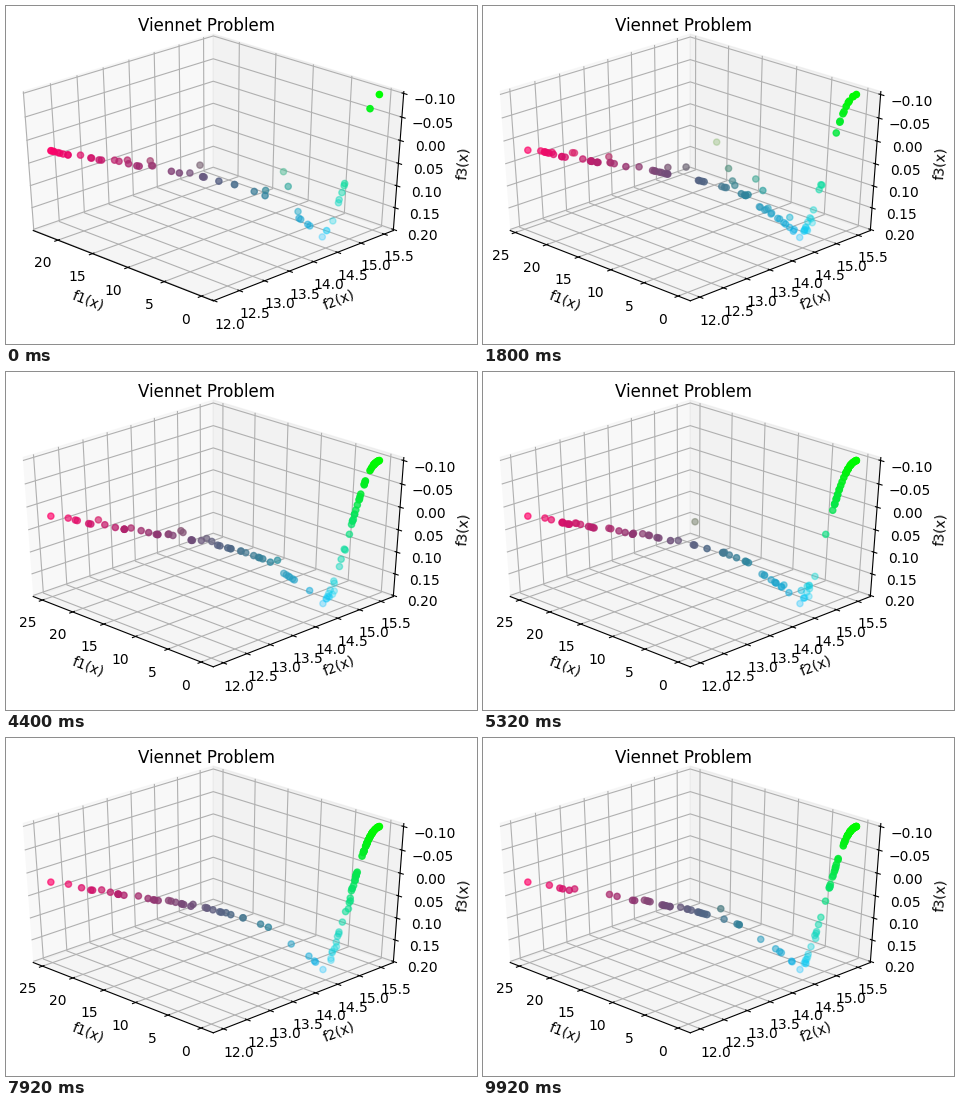
A matplotlib script for the animation above (10 s loop, 471x338 px).

```python
import numpy as np
import matplotlib.pyplot as plt
from matplotlib.animation import FuncAnimation
from matplotlib.ticker import MultipleLocator

W, H, DPI = 471, 338, 100
GENERATIONS = 100
AXES_BOX = (-31.5, 14, 465, 294)  # left, top, width, height in pixels

plt.rcParams["font.family"] = "DejaVu Sans"

rng = np.random.default_rng(7)
CHANCE = rng.random((100, 40, 4))
TURN = rng.normal(size=(100, 40))


def objectives(x, y):
    s = x**2 + y**2
    f1 = s / 2 + np.sin(s)
    f2 = (3 * x - 2 * y + 4) / 8 + (x - y + 1) / 27 + 15
    f3 = 1 / (s + 1) - 1.1 * np.exp(-s)
    return np.array([f1, f2, f3])


def individual(i, gen):
    """Decision vector of one individual; it is replaced every few generations."""
    epoch = (gen + i * 5) // (4 + i * 7 % 9) % 40
    kind, u, stray, band = CHANCE[i, epoch]
    age = gen / GENERATIONS
    green = 0.09 + 0.36 * age**0.8
    if kind < green:
        s, spread = (0.8 * u) ** 2, 0.15
    elif kind < green + 0.13:
        s, spread = 0.7 + 1.5 * u, 0.3
    else:
        s, spread = 4.19 + 2 * np.pi * int(7 * band) + 3.1 * u, 0.04
        if stray < 0.3 - 0.15 * age:
            spread = 0.45
    angle = np.arctan2(0.287, -0.412) + spread * TURN[i, epoch]
    r = np.sqrt(s)
    x, y = r * np.cos(angle), r * np.sin(angle)
    if x < -5:
        x, y = -5, np.sqrt(max(s - 25, 0))
    return x, min(y, 5)


def population(gen):
    size = int(100 - 46 * np.exp(-gen / 4))
    fade = np.exp(-gen / 7)
    ends = [(-5, 5 - 0.64 * fade), (-0.12 * fade, 0.08 * fade), (-1.36, 0.94)]
    pts = ends + [individual(i, gen) for i in range(size - len(ends))]
    x, y = np.array(pts).T
    return objectives(x, np.minimum(y, ends[0][1]))


fig = plt.figure(figsize=(W / DPI, H / DPI), dpi=DPI, facecolor="white")
left, top, width, height = AXES_BOX
ax = fig.add_axes((left / W, 1 - (top + height) / H, width / W, height / H),
                  projection="3d")
ax.apply_aspect = lambda position=None: None  # keep the wide axes rectangle
ax.patch.set_visible(False)
ax.set_box_aspect((1, 1, 1), zoom=0.9468)
ax.view_init(elev=-147, azim=45)
for axis, name, step in zip((ax.xaxis, ax.yaxis, ax.zaxis),
                            ("f1(x)", "f2(x)", "f3(x)"), (5, 0.5, 0.05)):
    axis.set_label_text(name)
    axis.set_major_locator(MultipleLocator(step))
fig.text(201 / W, 1 - 25 / H, "Viennet Problem", fontsize=12, ha="center")

dots = []


def draw(gen):
    while dots:
        dots.pop().remove()
    f = population(gen)
    lo, hi = f.min(axis=1), f.max(axis=1)
    rgb = (f.T - lo) / (hi - lo)
    dots.append(ax.scatter(*f, c=rgb, s=20))
    for set_lim, a, b, margin in zip((ax.set_xlim, ax.set_ylim, ax.set_zlim),
                                     lo, hi, (0.05, 0.05, 0)):
        pad = (b - a) * (margin + (1 + 2 * margin) / 48)
        set_lim(a - pad, b + pad)
    return dots


anim = FuncAnimation(fig, draw, frames=GENERATIONS, interval=100,
                     init_func=lambda: dots, repeat=True, repeat_delay=0)
plt.show()
```
